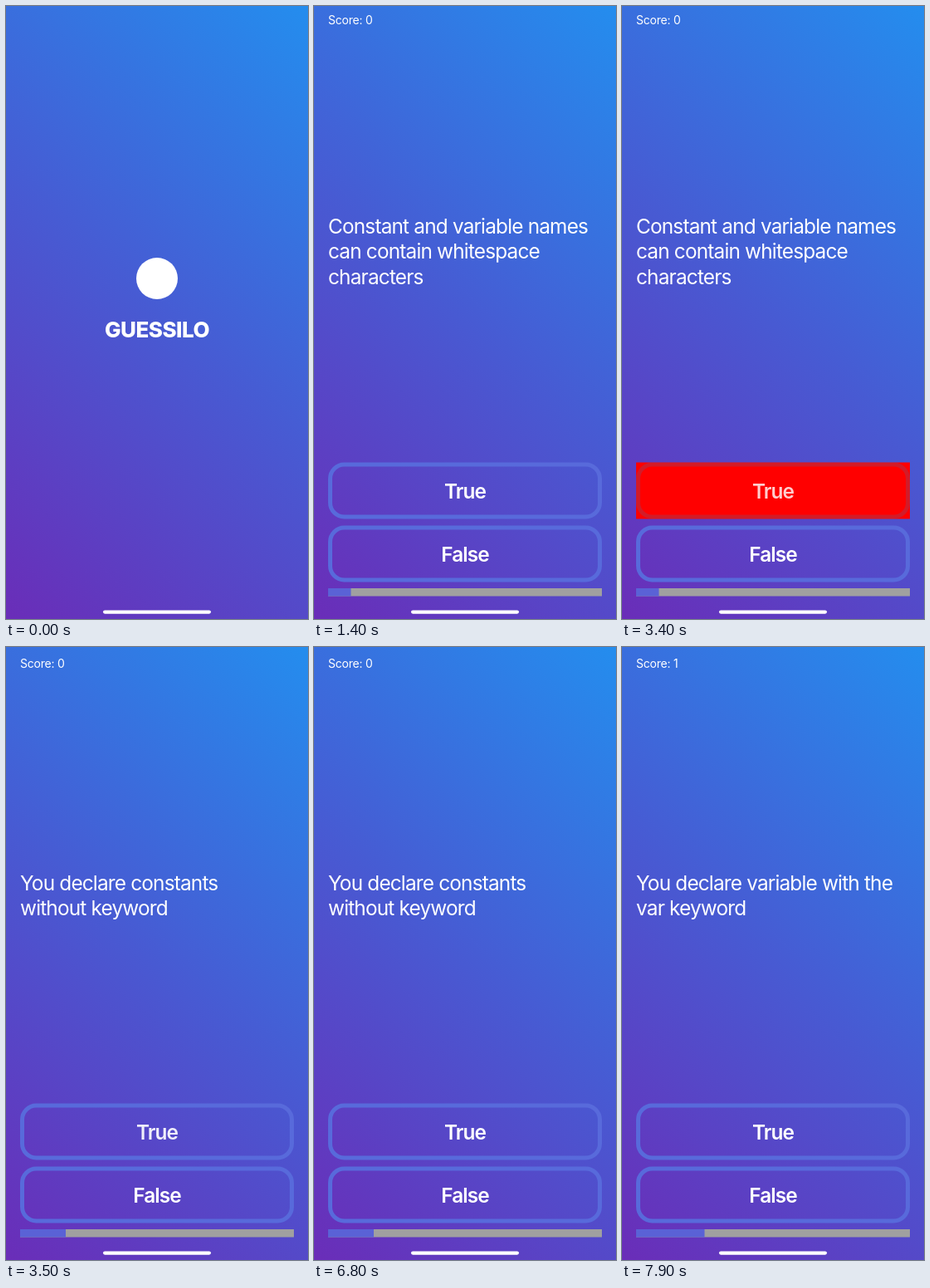
These frames come from a looping animation (364x738 px, 8000 ms). An HTML page:

```html
<!DOCTYPE html>
<html lang="en">
<head>
<meta charset="utf-8">
<title>Quiz</title>
<style>
  html, body { margin: 0; width: 100%; height: 100%; overflow: hidden; }
  body { background: linear-gradient(42deg, #6a2db8, #475bd3 50%, #248dee); }
  svg { display: block; width: 100%; height: 100%; }
  text {
    font-family: Inter, Roboto, sans-serif;
    font-optical-sizing: none;
    fill: #fff;
  }
  .question { font-size: 24.4px; letter-spacing: -.034em; }
  .score { font-size: 14px; letter-spacing: -.015em; }
  .label { font-size: 24.4px; font-weight: 600; letter-spacing: -.036em; text-anchor: middle; }
  .title { font-size: 26px; font-weight: 800; letter-spacing: -.02em; text-anchor: middle; }
  .border { fill: none; stroke: #586adb; stroke-width: 5; }
</style>
</head>
<body>
<svg viewBox="0 0 364 738">
  <g id="quiz">
    <text id="score" class="score" x="17"></text>
    <g id="question"></g>
    <g id="buttons"></g>
    <rect x="17" y="701" width="330" height="9.5" fill="#a0a0a0"/>
    <rect id="progress" x="17" y="701" height="9.5" fill="#5a62d6"/>
  </g>
  <g id="splash">
    <circle cx="182" cy="328" r="25" fill="#fff"/>
    <text class="title" x="182" y="399">GUESSILO</text>
  </g>
  <rect x="117" y="727.5" width="130" height="4.2" rx="2.1" fill="#fff"/>
</svg>
<script>
const LOOP = 8000, FLASH = 200, RECOVER = 400;
const SPLASH_FADE = [750, 1100];
const byId = id => document.getElementById(id);
const clamp = v => Math.min(1, Math.max(0, v));

const screens = [
  { from: 0, score: 0, scoreY: 21.5, top: 274,
    lines: ['Constant and variable names', 'can contain whitespace', 'characters'] },
  { from: 3500, score: 0, scoreY: 25, top: 292.5,
    lines: ['You declare constants', 'without keyword'] },
  { from: 7100, score: 1, scoreY: 25, top: 292.5,
    lines: ['You declare variable with the', 'var keyword'] }
];

const buttons = [
  { label: 'True', y: 549.5, tap: 3300, color: '#f00' },
  { label: 'False', y: 625.5, tap: 6900, color: '#0f0' }
];

for (const b of buttons) {
  const group = document.createElementNS('http://www.w3.org/2000/svg', 'g');
  group.innerHTML = `
    <rect x="17" y="${b.y}" width="330" height="68" fill="${b.color}"/>
    <rect class="border" x="19.5" y="${b.y + 2.5}" width="325" height="63" rx="17"/>
    <text class="label" x="182" y="${b.y + 43.5}">${b.label}</text>`;
  byId('buttons').append(group);
  [b.fill, b.border, b.text] = group.children;
}

let shown = -1;
function showScreen(index) {
  if (index === shown) return;
  shown = index;
  const s = screens[index];
  byId('score').textContent = 'Score: ' + s.score;
  byId('score').setAttribute('y', s.scoreY);
  byId('question').innerHTML = s.lines.map((line, i) =>
    `<text class="question" x="17" y="${s.top + i * 30.4}">${line}</text>`).join('');
  byId('progress').setAttribute('width', 330 * (index + 1) / 12);
}

function render(t) {
  const fade = clamp((t - SPLASH_FADE[0]) / (SPLASH_FADE[1] - SPLASH_FADE[0]));
  byId('splash').style.opacity = 1 - fade;
  byId('quiz').style.opacity = fade;
  showScreen(screens.findLastIndex(s => t >= s.from));

  for (const b of buttons) {
    const since = t - b.tap;
    const lit = since >= 0 && since < FLASH;
    b.fill.style.display = lit ? '' : 'none';
    b.border.style.stroke = lit ? 'rgba(80,110,160,.25)' : '';
    // The pressed label dims, then eases back to full white.
    b.text.style.opacity = since < 0 ? 1 : 1 - .35 * (1 - clamp(since / RECOVER)) ** 2;
  }
}

const start = performance.now();
function tick() {
  render((performance.now() - start) % LOOP);
  requestAnimationFrame(tick);
}
tick();
</script>
</body>
</html>
```
